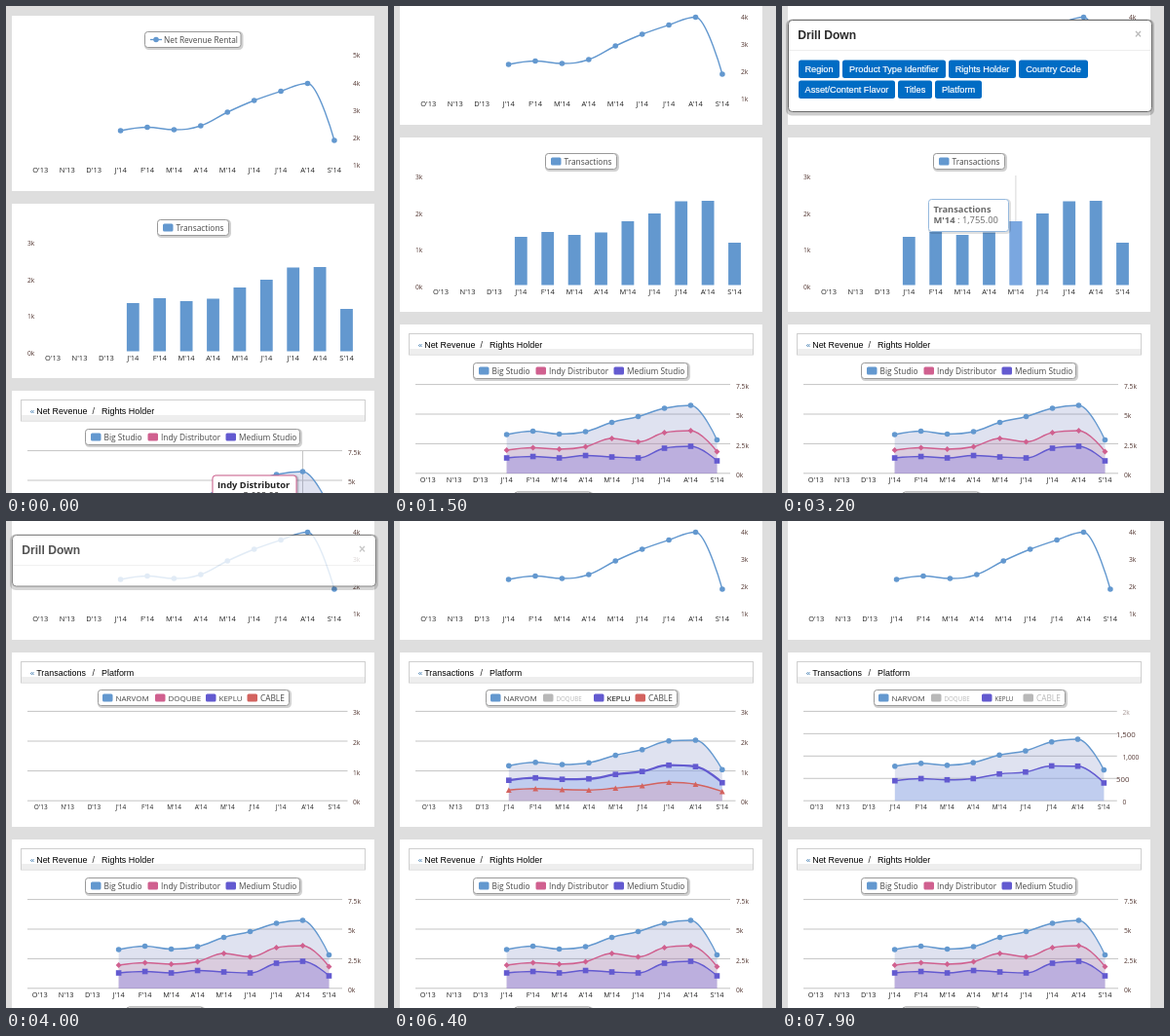
Recreate the animation shown at these times as an HTML page. Size 392 by 500 pixels, loop 8000 ms.

```html
<!DOCTYPE html>
<html lang="en">
<head>
<meta charset="utf-8">
<title>Drill down dashboard</title>
<style>
  html, body { margin: 0; width: 100%; height: 100%; overflow: hidden; background: #dedede; }
  svg { display: block; width: 392px; height: 500px; font-family: "Open Sans", "Noto Sans", sans-serif; }
  .ui { font-family: "Liberation Sans", Arial, sans-serif; }
</style>
</head>
<body>
<svg id="stage" viewBox="0 0 392 500" xmlns="http://www.w3.org/2000/svg"></svg>
<script>
const LOOP = 8000, STEP = 100;
const stage = document.getElementById('stage');
const MONTHS = "O'13 N'13 D'13 J'14 F'14 M'14 A'14 M'14 J'14 J'14 A'14 S'14".split(' ');
const BLUE = '#6398cf', PINK = '#d0608f', VIOLET = '#635ad0', RED = '#d3635f', OFF = '#b8b8b8';
const FILL = {
  [BLUE]: 'rgba(95,110,180,.2)',
  [PINK]: 'rgba(203,136,167,.25)',
  [VIOLET]: 'rgba(143,130,221,.4)',
  [RED]: 'rgba(219,130,155,.27)'
};
const SOFT = 'rgba(145,172,237,.4)';
const INK = '#484848';

const clamp = v => Math.max(0, Math.min(1, v));
const ramp = (t, from, len) => clamp((t - from) / len);
const swing = u => 0.5 - Math.cos(u * Math.PI) / 2;
const mix = (a, b, p) => a + (b - a) * p;
const n = v => +v.toFixed(2);

const text = (x, y, s, size, fill, extra = '') =>
  `<text x="${n(x)}" y="${n(y)}" font-size="${size}" fill="${fill}" ${extra}>${s}</text>`;
const rect = (x, y, w, h, fill, extra = '') =>
  `<rect x="${n(x)}" y="${n(y)}" width="${n(w)}" height="${n(h)}" fill="${fill}" ${extra}/>`;
const line = (x1, y1, x2, y2, color, extra = '') =>
  `<path d="M${n(x1)} ${n(y1)}L${n(x2)} ${n(y2)}" stroke="${color}" ${extra}/>`;
const group = (body, attr) => `<g ${attr}>${body}</g>`;

// Soft spline: tangents flattened so that it never overshoots a point.
function spline(pts) {
  let d = `M${n(pts[0][0])} ${n(pts[0][1])}`, out = pts[0];
  for (let i = 1; i < pts.length; i++) {
    const [x, y] = pts[i], [px, py] = pts[i - 1], next = pts[i + 1];
    let inn = [x, y], right = [x, y];
    if (next) {
      const lx = (1.5 * x + px) / 2.5, rx = (1.5 * x + next[0]) / 2.5;
      let ly = (1.5 * y + py) / 2.5, ry = (1.5 * y + next[1]) / 2.5;
      const fix = (ry - ly) * (rx - x) / (rx - lx) + y - ry;
      ly += fix; ry += fix;
      const l = Math.max(Math.min(py, y), Math.min(Math.max(py, y), ly));
      if (l !== ly) { ly = l; ry = 2 * y - ly; }
      const r = Math.max(Math.min(next[1], y), Math.min(Math.max(next[1], y), ry));
      if (r !== ry) { ry = r; ly = 2 * y - ry; }
      inn = [lx, ly]; right = [rx, ry];
    }
    d += `C${[...out, ...inn, x, y].map(n).join(' ')}`;
    out = right;
  }
  return d;
}

function marker(x, y, color) {
  if (color === PINK) return `<path d="M${n(x)} ${n(y - 3)}l3 3l-3 3l-3 -3z" fill="${color}"/>`;
  if (color === VIOLET) return rect(x - 2.8, y - 2.8, 5.6, 5.6, color);
  if (color === RED) return `<path d="M${n(x)} ${n(y - 2.8)}l2.9 5.5h-5.8z" fill="${color}"/>`;
  return `<circle cx="${n(x)}" cy="${n(y)}" r="2.8" fill="${color}"/>`;
}

function series(pts, color, base, bold, fill = FILL[color]) {
  const d = spline(pts);
  const area = base
    ? `<path d="${d}L${n(pts[8][0])} ${base}L${n(pts[0][0])} ${base}z" fill="${fill}"/>` : '';
  return area + `<path d="${d}" fill="none" stroke="${color}" stroke-width="${bold ? 2.2 : 1.4}"/>` +
    pts.map(p => marker(...p, color)).join('');
}

const plot = (ys, left, slot) => ys.map((y, i) => [left + slot * (i + 3.5), y]);
const xLabels = (left, slot, y, size) => MONTHS.map((m, i) =>
  text(left + slot * (i + .5), y, m, size, '#222', 'text-anchor="middle"')).join('');
const yLabel = (x, y, s, size = 6.7, extra = '') => text(x, y + 2.4, s, size, '#523530', extra);

function box(x, y, w, h, border = '#999') {
  const r = 'rx="3"';
  return rect(x + 1, y + 1, w, h, 'none', r + ' stroke="#000" stroke-opacity=".18" stroke-width="3"') +
    rect(x, y, w, h, '#fff', `${r} stroke="${border}"`);
}
const swatch = (x, y, color) => rect(x, y, 10.5, 8, color, 'rx="1.5"');

function legend(x, y, w, items) {
  return box(x, y, w, 16) + items.map(([sx, label, color, ink = INK, size = 8.35]) =>
    swatch(sx, y + 4, color) + text(sx + 13.5, y + 11, label, size, ink)).join('');
}

function crumbs(y, a, b) {
  return rect(15.5, y, 353, 21.5, '#fff', 'stroke="#cfcfcf"') +
    rect(16, y + 15.5, 352, 5.5, '#eee') +
    group(text(24.8, y + 14, '«', 8, '#2f6fa8') + text(31.2, y + 14.5, a, 8.95, '#000') +
      text(88.5, y + 14.5, '/', 8.95, '#222') + text(98, y + 14.5, b, 8.95, '#000'), 'class="ui"');
}

function tooltip(x, y, w, color, title, month, value) {
  return box(x, y, w, 33, color) +
    text(x + 5, y + 13, title, 9.3, '#222', 'font-weight="700"') +
    text(x + 5, y + 24.2, `<tspan font-weight="700">${month}</tspan> : ${value}`, 9.4, '#222');
}

const RENTAL = [128, 124.5, 127, 123, 109, 97, 87.5, 79.5, 138];
function rentalCard() {
  let s = rect(6, 10, 372, 180, '#fff') + box(142.5, 26.5, 98.5, 16) +
    line(148, 34.5, 160, 34.5, BLUE, 'stroke-width="1.3"') + marker(154, 34.5, BLUE) +
    text(162, 37.5, 'Net Revenue Rental', 8.3, INK);
  for (let i = 0; i < 5; i++) s += yLabel(356, 51 + i * 28.1, 5 - i + 'k');
  return s + xLabels(21.6, 27.42, 170.8, 7.5) + series(plot(RENTAL, 21.6, 27.42), BLUE);
}

const TOPS = [305, 300, 303, 300.5, 289, 281, 268.5, 268, 311];
function barChart(hover) {
  let s = legend(155.5, 219.5, 73, [[161, 'Transactions', BLUE]]);
  for (let i = 0; i < 4; i++) s += yLabel(22, 243.5 + i * 37.6, 3 - i + 'k');
  s += xLabels(34.4, 27.4, 363.8, 7.5);
  TOPS.forEach((y, i) => {
    s += rect(34.4 + 27.4 * (i + 3.5) - 6.4, y, 12.8, 354.5 - y, BLUE);
  });
  if (hover) {
    s += group(line(239.9, 242, 239.9, 289, '#c4c4c4') + rect(233.5, 289, 12.8, 65.5, '#86afe9') +
      tooltip(150.5, 266.5, 82, BLUE, 'Transactions', "M'14", '1,755.00'), `opacity="${n(hover)}"`);
  }
  return s;
}

// Stacked heights, bottom series first, in px at the 3k scale.
const PARTS = [
  [11, 12.5, 11.5, 11, 13, 15.5, 19, 17, 9.5],
  [10, 11, 10.5, 11.5, 14, 14.5, 17.5, 18, 9],
  [10, 11, 10.5, 11, 13.5, 16, 17, 17.5, 9],
  [10, 10.5, 10, 11, 13, 14.5, 16.5, 18.5, 9]
];
const INKS = [RED, VIOLET, PINK, BLUE];

function platformChart(t) {
  const base = 355.2, k = 30.6, zoom = 2;
  const pinkOff = t >= 5900, redOff = t > 7400;
  const p = swing(ramp(t, 5900, 1000)), q = swing(ramp(t, 7400, 1000));
  const hover = t >= 6900 ? (redOff ? -1 : 0) : t >= 6300 ? (t < 6800 ? 1 : -1) : t >= 5100 && !pinkOff ? 2 : -1;
  const hidden = [redOff, false, pinkOff, false];
  const right = mix(350.5, 337, q), slot = (right - 22) / 12;
  const ink = i => hidden[i] ? OFF : INKS[i];
  const word = i => hidden[i] ? OFF : hover === i ? '#000' : INK;

  let s = crumbs(212.5, 'Transactions', 'Platform') + legend(94.5, 241.5, 196, [
    [99, 'NARVOM', ink(3), word(3), 8],
    [153, 'DOQUBE', ink(2), word(2), pinkOff ? 6.2 : 8],
    [205, 'KEPLU', ink(1), word(1), t >= 6800 ? 6.3 : 8],
    [247.5, 'CABLE', ink(0), word(0), 8.3]
  ]);

  const labelX = mix(356, 343, q);
  const ticks = redOff
    ? [[0, '0'], [.5, '500', 1], [1, '1,000'], [1.5, '1,500', 1], [2, '2k']]
    : [[0, '0k'], [1, '1k'], [2, '2k'], [3, '3k']];
  for (const [v, label, fresh] of ticks) {
    const y = base - v * k * mix(1, zoom, q);
    if (y < 262) continue;
    const o = v === 2 && redOff ? 1 - q : fresh ? clamp(q * 2) : 1;
    s += line(22, y, right, y, '#c4c4c4', `opacity="${fresh ? n(o) : 1}"`) +
      yLabel(fresh ? 343 : labelX, y + 1.6, label, fresh ? 7.8 : 6.7, `opacity="${n(o)}"`);
  }
  s += xLabels(22, slot, 363.6, 6.5);

  // Each point glides straight from its old height to its new one.
  const from = Array(9).fill(0), to = Array(9).fill(0);
  const stack = PARTS.map((part, i) => part.map((h, j) => {
    from[j] += i === 2 ? h * (1 - p) : h;
    to[j] += i === 0 || i === 2 ? 0 : h * zoom;
    return base - mix(from[j], to[j], q);
  }));
  const reveal = swing(ramp(t, 4040, 1000));
  let body = '';
  for (let i = 3; i >= 0; i--) {
    if (!hidden[i]) body += series(plot(stack[i], 22, slot), INKS[i], base, hover === i,
      i === 1 && pinkOff ? SOFT : FILL[INKS[i]]);
  }
  return s + `<clipPath id="wipe">${rect(22, 230, 328 * reveal, 140, '#000')}</clipPath>` +
    group(body, 'clip-path="url(#wipe)"');
}

const HOLDERS = [
  [BLUE, [508, 504.5, 507.5, 505, 495.5, 489.5, 481, 478, 513.5]],
  [PINK, [524, 521.5, 523, 520.5, 512, 515.5, 506, 504, 525.5]],
  [VIOLET, [532, 530.5, 532, 529.5, 531, 532, 522, 520, 535]]
];
function holderCard(hover) {
  let s = rect(6, 395, 372, 200, '#fff') + crumbs(404.5, 'Net Revenue', 'Rights Holder') +
    legend(81.5, 434.5, 220, [[87, 'Big Studio', BLUE], [145.5, 'Indy Distributor', PINK], [225.5, 'Medium Studio', VIOLET]]);
  ['7.5k', '5k', '2.5k', '0k'].forEach((label, i) => {
    const y = 456.6 + i * 30.4;
    s += line(22, y, 345, y, '#c4c4c4') + yLabel(351, y + 1.8, label);
  });
  s += xLabels(21.2, 26.98, 556.8, 7.4);
  if (hover) s += line(304.5, 457, 304.5, 548, '#c4c4c4');
  for (const [color, ys] of HOLDERS) s += series(plot(ys, 21.2, 26.98), color, 548);
  if (hover) s += tooltip(212, 482, 86, PINK, 'Indy Distributor', "A'14", '3,608.00');
  return s + box(123.5, 567, 79, 16);
}

const BUTTONS = [
  [17, 42, 0, 'Region'], [62, 106, 0, 'Product Type Identifier'], [171, 69, 0, 'Rights Holder'],
  [243, 71, 0, 'Country Code'], [17, 99, 21, 'Asset/Content Flavor'],
  [119, 35, 21, 'Titles'], [157, 48, 21, 'Platform']
];
function modal(t) {
  if (t < 2400 || t >= 4100) return '';
  const u = ramp(t, 2300, 500), full = t < 3800;
  const y = 14 - 125 * (1 - u) ** 3;
  const fade = u * (1 - ramp(t, 3900, 200) ** 2.4);
  const h = full ? 94.5 : 53;
  let s = rect(6, 1.5, 374, h + .5, 'none', 'rx="4" stroke="#000" stroke-opacity=".2" stroke-width="4"') +
    rect(6.5, .5, 373, h - .5, '#fff', 'rx="4" stroke="#6a6a6a"') +
    line(7, 31.5, 379, 31.5, '#eee') +
    text(16.3, 20, 'Drill Down', 12.1, '#2a2a2a', 'font-weight="700"') +
    text(362, 18.5, '×', 12, '#bbb', 'font-weight="700"');
  if (full) for (const [x, w, dy, label] of BUTTONS) {
    s += rect(x, 41.5 + dy, w, 18.5, '#006cc4', 'rx="2.5"') +
      text(x + w / 2, 54 + dy, label, 9.2, '#fff', 'text-anchor="middle" stroke="#fff" stroke-width=".2"');
  }
  return group(s, `class="ui" transform="translate(0 ${n(y)})" opacity="${n(fade)}"`);
}

function draw(t) {
  const scroll = 68 * ramp(t, 700, 800) ** 1.13;
  const barHover = t < 1800 ? 0 : 1 - ramp(t, 3100, 300);
  const page = rentalCard() + rect(6, 203, 372, 179, '#fff') +
    (t < 3800 ? barChart(barHover) : platformChart(t)) + holderCard(t < 300);
  stage.innerHTML = rect(0, 0, 392, 500, '#dedede') +
    group(page, `transform="translate(0 ${-n(scroll)})"`) + modal(t);
}

let last = -1;
function tick(now) {
  const t = Math.floor(now % LOOP / STEP) * STEP;
  if (t !== last) draw(last = t);
  requestAnimationFrame(tick);
}
draw(0);
requestAnimationFrame(tick);
</script>
</body>
</html>
```
